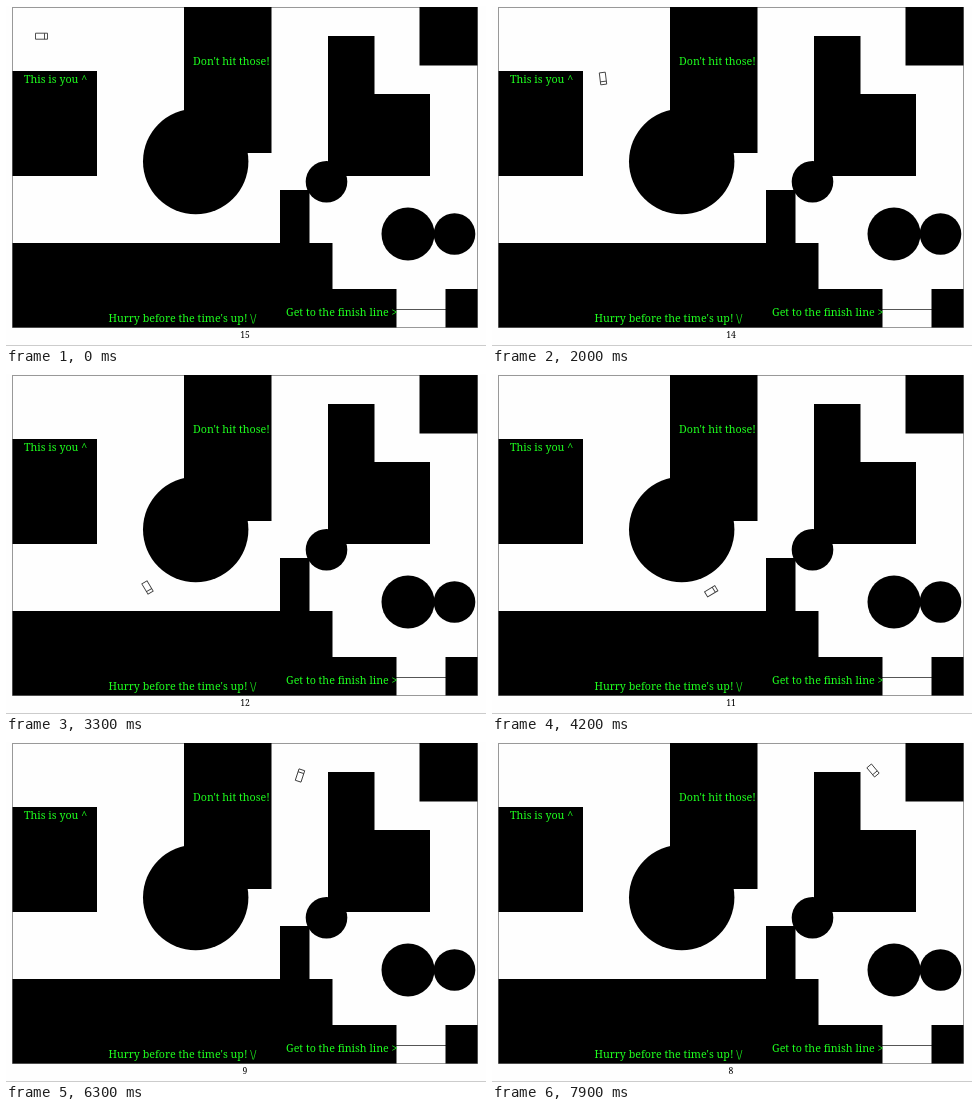
An HTML page for the animation above (8 s loop, 480 by 340 pixels).

```html
<!DOCTYPE html>
<html lang="en">
<head>
<meta charset="utf-8">
<title>Driving game</title>
<style>
  html, body { margin: 0; width: 100%; height: 100%; overflow: hidden; background: #fefefe; }
  svg { display: block; width: 480px; height: 340px; }
  text { font: 10.7px "Noto Serif", serif; fill: #1eff1e; }
  #timer { font-size: 8.6px; fill: #000; text-anchor: middle; }
  .line { fill: none; stroke: #999; }
  #car { fill: none; stroke: #3c3c3c; stroke-width: .9; }
</style>
</head>
<body>
<svg viewBox="0 0 480 340">
  <rect class="line" x="6.5" y="1.5" width="465" height="320"/>
  <path class="line" style="stroke:#ccc" d="M0 339.5H480"/>
  <path class="line" style="stroke:#555" d="M390 303.5H440"/>
  <path d="M178 1H265.5V147H178Z M6.5 65H91V170H6.5Z M322 30H368.5V88H424V170H322Z
    M413.5 1H471.5V59.5H413.5Z M274 184H303.5V238H274Z
    M6.5 237H326.5V283H390.5V321.5H6.5Z M439.5 283H471.5V321.5H439.5Z"/>
  <circle cx="189.7" cy="155.5" r="52.7"/>
  <circle cx="320.5" cy="175.7" r="20.8"/>
  <circle cx="402" cy="228" r="26.5"/>
  <circle cx="448.5" cy="228" r="20.8"/>
  <text x="18" y="77">This is you ^</text>
  <text x="187" y="59">Don't hit those!</text>
  <text x="102.5" y="315.5">Hurry before the time's up! \/</text>
  <text x="280" y="309.7">Get to the finish line &gt;</text>
  <text id="timer" x="239" y="332">15</text>
  <path id="car" d="M-6 -3H6V3H-6Z M3 -3V3"/>
</svg>
<script>
  const LOOP = 8000, STEP = 100, BEND = 1.15;
  const car = document.getElementById('car');
  const timer = document.getElementById('timer');

  // Waypoints: time, x, y, heading in degrees
  const route = [
    [0, 35.5, 30.2, 0],
    [1100, 69, 30.5, 5],
    [2000, 111, 72.5, 83],
    [3300, 141.5, 213.5, 59],
    [3900, 193, 227.5, -12],
    [5100, 271, 153.5, -59],
    [6300, 294, 33.5, -72],
    [7200, 344, 13.3, 8],
    [7900, 381, 28.5, 50]
  ].map(([t, x, y, deg]) => ({ t, x, y, dir: deg * Math.PI / 180 }));

  // Position and slope of a cubic from p to q with end slopes m and n
  function cubic(p, q, m, n, u) {
    const v = 1 - u;
    return {
      at: p + (q - p) * u * u * (3 - 2 * u) + u * v * (m * v - n * u),
      slope: 6 * (q - p) * u * v + m * v * (1 - 3 * u) + n * u * (3 * u - 2)
    };
  }

  function pose(t) {
    const i = Math.max(1, route.findIndex(p => p.t >= t));
    const a = route[i - 1], b = route[i];
    let u = (t - a.t) / (b.t - a.t);
    if (i === 1) u *= u; // pulls away from rest
    const pull = BEND * Math.hypot(b.x - a.x, b.y - a.y);
    const x = cubic(a.x, b.x, pull * Math.cos(a.dir), pull * Math.cos(b.dir), u);
    const y = cubic(a.y, b.y, pull * Math.sin(a.dir), pull * Math.sin(b.dir), u);
    const turn = Math.atan2(y.slope, x.slope) * 180 / Math.PI;
    return `translate(${x.at} ${y.at}) rotate(${turn})`;
  }

  function draw(now) {
    const t = Math.floor(now % LOOP / STEP) * STEP;
    car.setAttribute('transform', pose(t));
    timer.textContent = 15 - Math.max(0, Math.floor((t - 100) / 1000));
    requestAnimationFrame(draw);
  }
  draw(0);
</script>
</body>
</html>
```
